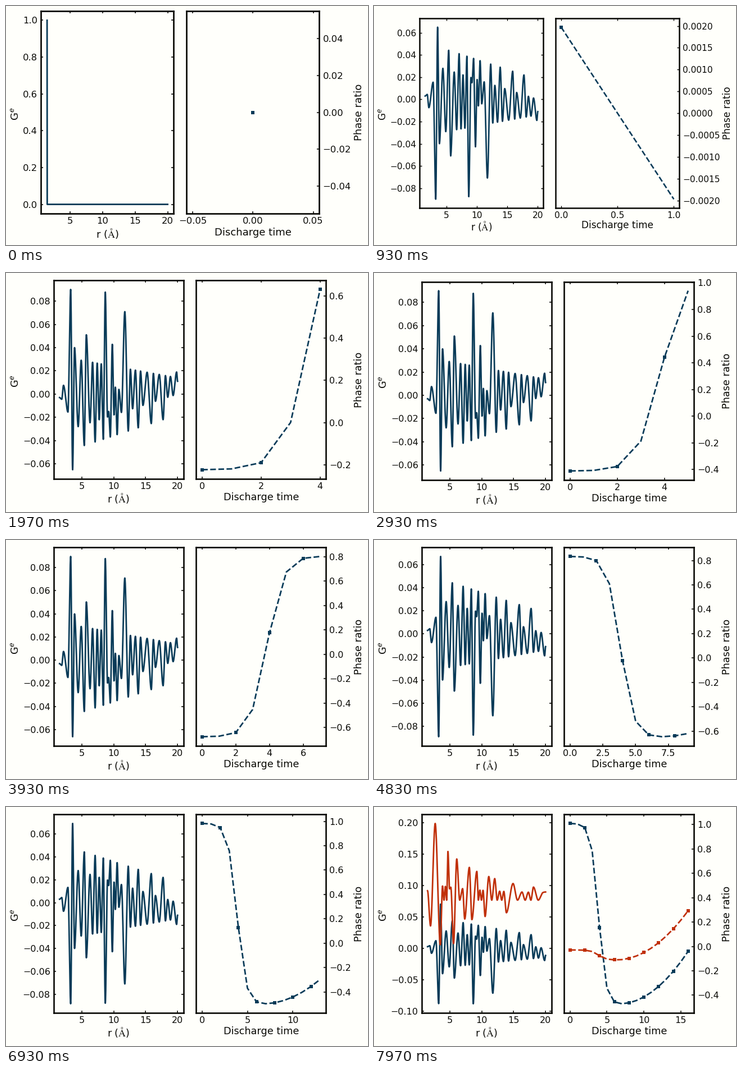
A matplotlib script for the animation above (8000 ms loop, 644 px wide and 426 px high).

```python
import numpy as np
import matplotlib.pyplot as plt
from matplotlib.animation import FuncAnimation
from matplotlib.ticker import MultipleLocator

W, H, DPI = 644, 426, 100
FRAMES, STEP = 240, 15
PT = 72 / DPI
PAPER, INK, TEAL, RUST = "#fffffb", "#080804", "#093b58", "#c0300a"
TICK, LABEL = 16.4, 18.0
SECOND_FROM = 15
R = np.linspace(1.5, 20, 926)

plt.rcParams.update({
    "font.family": "DejaVu Sans",
    "text.color": INK, "axes.edgecolor": INK,
    "xtick.color": INK, "ytick.color": INK,
})


def smooth(points, x):
    """Monotone cubic through a dict of turning points."""
    px = np.array(sorted(points))
    py = np.array([points[p] for p in px]) / 1000
    h = np.diff(px)
    d = np.diff(py) / h
    m = np.zeros_like(px)
    same = d[:-1] * d[1:] > 0
    a, b = d[:-1][same], d[1:][same]
    m[1:-1][same] = 2 * a * b / (a + b)
    i = np.clip(np.searchsorted(px, x, "right") - 1, 0, len(h) - 1)
    t = (x - px[i]) / h[i]
    return (py[i] * (1 + 2 * t) * (1 - t) ** 2 + py[i + 1] * t * t * (3 - 2 * t)
            + h[i] * t * (1 - t) * (m[i] * (1 - t) - m[i + 1] * t))


def ripple(strong, weak, high, low, trough, keys):
    """Two families of peaks with troughs halfway between, plus key points."""
    points = {r: high(r) for r in strong} | {r: low(r) for r in weak}
    peaks = sorted(points)
    for a, b in zip(peaks, peaks[1:]):
        mid = (a + b) / 2
        if min(abs(mid - r) for r in keys) > .36:
            points[mid] = trough(mid)
    return smooth(points | keys, R)


def main_pattern(w):
    return ripple(
        strong=[5.38, 7.08, 8.36, 9.46, 10.53, 12.27, 13.83, 15.88, 17.73],
        weak=[4.42, 6.28, 7.72, 9.02, 10.04, 11.2, 12.95, 14.57, 16.53,
              18.46, 19.3],
        high=lambda r: 54 - 1.8 * r,
        low=lambda r: 36 - 1.8 * r,
        trough=lambda r: r - 34,
        keys={1.5: 3, 1.85: 4.5, 2.12: -7.5, 2.82: 15.5 - 3 * w,
              3.25: -90.2 + 2.5 * w, 3.55: 65.5 + 5.5 * w, 3.85: -40,
              5.7: -51 + 4 * w, 8.67: -88, 9.2: 15, 9.77: -43, 10.25: -6,
              10.8: -4, 11.73: -71, 19.85: -19, 20: -11})


def second_pattern():
    return ripple(
        strong=[4.7, 6.08, 8.05, 9.23, 11.1, 12.03, 14.9, 18.1],
        weak=[3.85, 4.3, 5.15, 7, 9.7, 10.2, 12.8, 13.46, 16.3, 17.3, 19.6],
        high=lambda r: 88 + 130 * np.exp(-r / 7),
        low=lambda r: 88 + 20 * np.exp(-r / 7),
        trough=lambda r: 77,
        keys={1.5: 92, 1.97: 36, 2.7: 199, 3.5: 6, 4.95: 95, 5.58: 8,
              7.33: 47, 8.45: 46, 10.52: 51, 13.86: 57, 20: 90})


def ratio(t, floor, drop, growth, start):
    """A sigmoid fall followed by quadratic growth."""
    fall = 1 / (1 + np.exp(2.03 * (t - 3.85)))
    return floor + drop * fall + growth * np.maximum(0, t - start) ** 2


def centred(v):
    """Zero mean, signed so that the largest value is positive."""
    v = v - v.mean()
    return v * (np.sign(v[np.argmax(np.abs(v).round(9))]) or 1)


def curves(k):
    if k == 0:
        return [(np.where(R == R[0], 1.0, 0.0), np.zeros(1), TEAL)]
    t = np.arange(k + 1)
    first = centred(ratio(t, -.475, 1.483, .0048, 6.5))
    pattern = np.sign(first[0]) * main_pattern(np.clip((k - 5) / 11, 0, 1))
    out = [(pattern, first, TEAL)]
    if k >= SECOND_FROM:
        second = centred(ratio(t, -.112, .082, .0042, 6.2))
        out.append((second_pattern(), second, RUST))
    return out


def visible_ticks(ax):
    lo, hi = ax.get_ylim()
    ticks = ax.get_yticks()
    labels = ax.yaxis.get_major_formatter().format_ticks(ticks)
    return [(t, s) for t, s in zip(ticks, labels) if lo <= t <= hi]


def label_width(ax):
    em = {".": .318, "\u2212": .838}
    return max(sum(em.get(c, .636) for c in s) for _, s in visible_ticks(ax))


def place(ax, x, y, s):
    w, h = 236 * s, 361 * s
    ax.set_position([x / W, 1 - (y + h) / H, w / W, h / H])


def style(ax, s):
    ax.tick_params(direction="in", top=True, length=4 * s * PT,
                   width=1.6 * s * PT, pad=6.2 * s * PT,
                   labelsize=TICK * s * PT)
    for spine in ax.spines.values():
        spine.set_linewidth(2.7 * s * PT)


def build(k):
    fig.clear()
    left, right = fig.add_axes([.1, .1, .3, .8]), fig.add_axes([.5, .1, .3, .8])
    for ax in (left, right):
        ax.set_facecolor(PAPER)
        place(ax, 63, 9, 1)
        style(ax, 1)
    left.tick_params(right=True)
    left.xaxis.set_major_locator(MultipleLocator(5))
    right.yaxis.tick_right()

    lines = []
    for pattern, score, color in curves(k):
        lines += left.plot(R, pattern, color=color)
        lines += right.plot(np.arange(k + 1), score, "--s", color=color,
                            markevery=2, mew=0)

    # The whole sheet shrinks to make room for wide tick labels
    wl, wr = label_width(left), label_width(right)
    s = W / (567.8 + TICK * (wl + wr))
    x, y = (36.3 + TICK * wl) * s, 213 - 204 * s
    for ax in (left, right):
        lo, hi = ax.get_ylim()
        gap = (hi - visible_ticks(ax)[-1][0]) / (hi - lo) * 361 * s
        y += max(0, 6.5 * s - gap) / 2
    for ax, dx in ((left, 0), (right, 259)):
        place(ax, x + dx * s, y, s)
        style(ax, s)
    for line in lines:
        line.set_linewidth(2.8 * s * PT)
        line.set_markersize(6.4 * s * PT)

    def text(tx, ty, label, **kw):
        fig.text(tx / W, 1 - ty / H, label, fontsize=LABEL * s * PT,
                 ha="center", **kw)

    base, mid = y + 361 * s, y + 180.5 * s
    text(x + 118 * s, base + 43.2 * s, r"r ($\mathrm{\AA}$)",
         va="baseline", math_fontfamily="stix")
    text(x + 377 * s, base + 39 * s, "Discharge time", va="baseline")
    text(17 * s, mid + 2.5 * s, "G$^e$", va="center", rotation=90)
    text(W - 16 * s, mid, "Phase ratio", va="center", rotation=90)


fig = plt.figure(figsize=(W / DPI, H / DPI), dpi=DPI, facecolor=PAPER)
shown = None


def draw(frame):
    global shown
    k = (frame + 1) // STEP
    if k != shown:
        build(k)
        shown = k
    return []


def reset():
    global shown
    shown = None
    return draw(0)


anim = FuncAnimation(fig, draw, frames=FRAMES, init_func=reset,
                     interval=8000 / FRAMES, repeat=True, repeat_delay=0)
plt.show()
```
